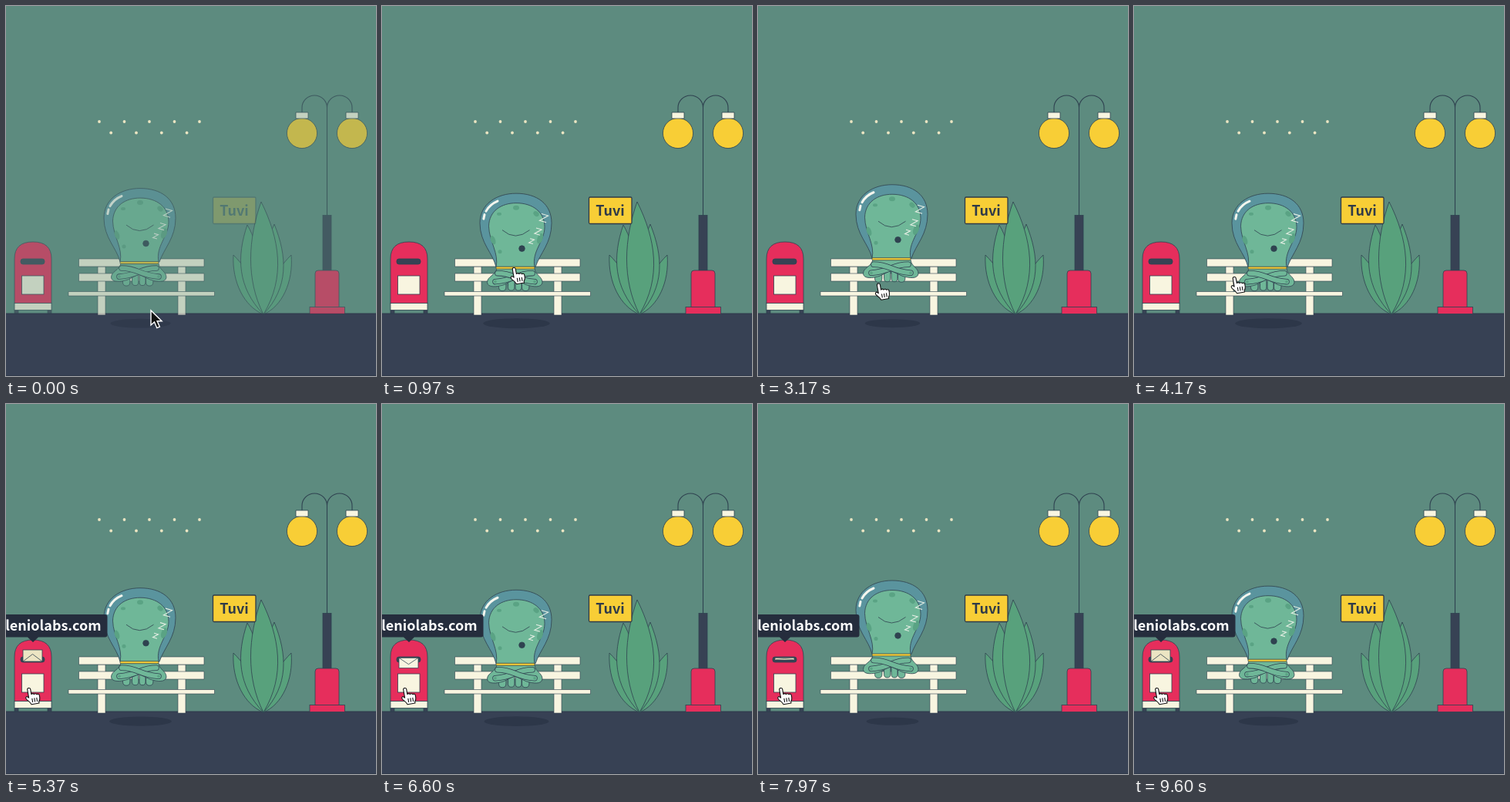
An HTML page that plays this animation: 480 px wide and 480 px high, repeating every 9.63 s.

```html
<!DOCTYPE html>
<html lang="en">
<head>
<meta charset="utf-8">
<title>Park bench</title>
<style>
  html, body { margin: 0; height: 100%; overflow: hidden; background: #5d8b7f; }
  svg { display: block; width: 100vw; height: 100vh; }
  text { font: bold 18px "Noto Sans CJK SC", "Noto Sans CJK JP", "Noto Sans", sans-serif; }
  .line { fill: none; stroke: #2f4250; }
  .ink { fill: #374254; }
  .red { fill: #e62e5c; }
  .cream { fill: #f8f5e0; }
  .yellow { fill: #f8ce36; }
  .skin { fill: #6fb798; }
  .spot { fill: #5aa384; stroke: none; }
  .leaf { fill: #58a17c; }
</style>
</head>
<body>
<svg viewBox="0 0 480 480">
  <rect width="480" height="480" fill="#5d8b7f"/>
  <rect y="399" width="480" height="81" fill="#374154"/>
  <path d="M0 399H480M0 479.5H480" stroke="#2f394a"/>
  <g id="dots" fill="#ebe5c2"></g>

  <g id="scene" stroke="#2f4250" stroke-width=".8">
    <ellipse id="shadow" cx="174.5" cy="411.7" fill="#2d3749" stroke="none"/>

    <g id="mailbox">
      <path class="ink" d="M11 394h5v5h-5zM54 394h5v5h-5z"/>
      <path class="red" d="M11 386V328Q11 306 35 306T59 328V386Z"/>
      <rect class="cream" x="11" y="385.500" width="48" height="9"/>
      <rect class="ink" x="19" y="328" width="31" height="7" rx="3"/>
      <rect class="cream" x="20.500" y="350" width="28.500" height="24"/>
      <g id="envelope">
        <rect x="22" y="-2.500" width="25" height="15"/>
        <path class="line" d="M22-2.500L34.500 7L47-2.500"/>
      </g>
    </g>

    <g class="leaf">
      <path d="M295 323C293 358 309 390 334 400C330 372 318 346 295 323Z"/>
      <path d="M370 323C373 358 358 390 334 400C336 372 347 346 370 323Z"/>
      <path d="M313 284C299 325 300 365 334 400C334 360 330 312 313 284Z"/>
      <path d="M348 283C365 325 367 365 334 400C334 360 335 312 348 283Z"/>
      <path d="M331 254C314 302 311 355 334 400C363 352 355 302 331 254Z"/>
    </g>

    <path class="line" stroke-width="1.100" d="M416.500 272V132A16.250 16 0 0 0 384 132V138M416.500 132A16.250 16 0 0 1 449 132V138"/>
    <rect class="ink" x="411" y="271.500" width="11" height="72"/>
    <path class="red" d="M401 391V347q0-4 4-4h23q4 0 4 4V391Z"/>
    <rect class="red" x="394" y="390.500" width="45.500" height="9"/>
    <g class="yellow"><circle cx="384" cy="165" r="19.600"/><circle cx="449" cy="165" r="19.600"/></g>
    <path class="cream" d="M376 138h16v8h-16zM441 138h16v8h-16z"/>

    <g class="cream" stroke-width=".6">
      <path d="M119 338h10v63h-10zM223 338h10v63h-10z"/>
      <path d="M94.500 328h162.500v10H94.500zM94.500 347h162.500v10H94.500zM81 370.500h189.500v5.500H81z"/>
    </g>

    <g id="alien">
      <path fill="#5a949e" d="M148 323C144 305 127 292 127 266C127 241 149 227.500 174 227.500C201 227.500 220 241 220 266C220 292 205 305 199 323Z"/>
      <path class="skin" d="M148 323C152 305 139 290 138.500 270C139 250 155 240 174 240C196 240 211 252 211 271C211 290 194 302 198 323Z"/>
      <g class="spot">
        <ellipse cx="174" cy="246" rx="4" ry="3"/>
        <ellipse cx="200" cy="254" rx="4" ry="3" transform="rotate(40 200 254)"/>
        <ellipse cx="152" cy="254" rx="3" ry="2"/>
        <ellipse cx="144" cy="288" rx="3" ry="6" transform="rotate(-20 144 288)"/>
        <circle cx="153" cy="303" r="2.500"/>
        <ellipse cx="205" cy="286" rx="3.500" ry="7" transform="rotate(20 205 286)"/>
      </g>
      <path class="line" d="M156 275Q173 290 191.500 275"/>
      <circle cx="181.500" cy="299" r="3.800" fill="#2f4250"/>
      <path d="M131.800 260.500L133 255M135 250.500Q140 241.500 150 237.500" fill="none" stroke="#f4f6ee" stroke-width="3" stroke-linecap="round"/>
      <path class="skin" d="M151.500 336v13q0 5 4.700 5t4.700-5v-13M163.500 336v13q0 4.500 4.200 4.500t4.200-4.500v-13M173 336v13q0 4.500 4 4.500t4-4.500v-13M181.500 336v13q0 5 4.700 5t4.700-5v-13"/>
      <path class="skin" d="M149 325C147 334 136.500 335 136.500 343C137 350 149 349 158 346L172 339L187 346C197 349 207 350 208 343C208 335 199 334 198 325Z"/>
      <g id="arms" fill="none" stroke-linecap="round"></g>
      <circle class="spot" cx="147" cy="342" r="1.800"/>
      <circle class="spot" cx="198" cy="342" r="1.800"/>
      <rect class="yellow" x="148" y="322.500" width="50" height="3" rx="1" stroke-width=".7"/>
      <g id="zs" fill="none" stroke="#e5eee4" stroke-width="1.100"></g>
    </g>
  </g>

  <g id="sign">
    <rect class="yellow" x="268.500" y="248" width="55.500" height="34.500" rx="1.500" stroke="#2f3a48" stroke-width="1.300"/>
    <text x="296" y="271.500" text-anchor="middle" fill="#2f3a48">Tuvi</text>
  </g>

  <g id="tooltip">
    <path fill="#252d3d" d="M-20 273H128.500q3 0 3 3V299.500q0 3-3 3H42L35 309L28 302.500H-20Z"/>
    <text x="123.500" y="294" text-anchor="end" fill="#fff">leniolabs.com</text>
  </g>

  <g id="cursor">
    <path id="arrow" d="M0 0V19l4.500-4 3.300 7.700 3.600-1.500-3.300-7.400h6Z" fill="#111" stroke="#fff" stroke-width="1.400"/>
    <g id="hand" transform="rotate(-10)" stroke="#111" stroke-width="1.100" stroke-linejoin="round">
      <path fill="#fff" d="M-2 12V1.500a2 2 0 0 1 4 0V8q2-1.500 3.500.6q2-1.400 3.500.8q2.500-1 3 1.500V14q0 3-2 5V21H0q-1-3-5-7q-2-3 .5-4q1 0 2.500 2Z"/>
      <path d="M2 13.500v5M5 13.500v5M8 13.500v5"/>
    </g>
  </g>
</svg>
<script>
const LOOP = 9.63;
const el = id => document.getElementById(id);
const set = (id, attrs) => { for (const k in attrs) el(id).setAttribute(k, attrs[k]); };
const clamp = v => Math.max(0, Math.min(1, v));

for (let i = 0; i < 9; i++) {
  const lower = i > 4;
  el("dots").innerHTML += `<circle cx="${lower ? 136.2 + 32.8 * (i - 5) : 121 + 32.5 * i}" cy="${lower ? 164.5 : 150}" r="1.9"/>`;
}
for (const d of ["M147 342Q160 341 172 336T195 331", "M198 342Q185 341 173 336T150 331"])
  el("arms").innerHTML += `<path d="${d}" stroke-width="7.5"/><path d="${d}" stroke="#6fb798" stroke-width="5.900"/>`;
for (const [x, y, size] of [[210, 259.5, 4.5], [202.5, 277, 3.7], [194, 289.5, 2.8]])
  el("zs").innerHTML += `<path transform="translate(${x} ${y}) rotate(16) scale(${size})" d="M-1-1H1L-1 1H1" vector-effect="non-scaling-stroke"/>`;

// Keys are [time, ...values]; each span eases in and out.
function along(keys, t) {
  const i = Math.max(1, keys.findIndex(k => k[0] >= t));
  const a = keys[i - 1], b = keys[i];
  const p = (1 - Math.cos(Math.PI * clamp((t - a[0]) / (b[0] - a[0])))) / 2;
  return a.slice(1).map((v, j) => v + (b[j + 1] - v) * p);
}
const bob = [[-0.95, 0], [0.8, 16], [2.56, 0], [4.33, 16], [5.1, 10.5], [6.2, 15.5], [7.95, 1.5], [8.68, 0], [10.43, 16]];
const pointer = [[0, 188, 395], [0.9, 171, 340], [2.6, 171, 338], [3.5, 150, 370], [4.17, 130, 352], [4.5, 88, 374], [4.85, 29.5, 369], [LOOP, 29.5, 369]];

function draw(t) {
  const [y] = along(bob, t), [px, py] = along(pointer, t);
  set("scene", { opacity: clamp(0.66 + t) });
  set("sign", { opacity: clamp(0.22 + t * 1.1) });
  set("alien", { transform: `translate(0 ${y})` });
  set("shadow", { rx: 33 + 0.66 * y, ry: 5 + 0.1 * y });

  const hover = t - 4.85;
  const flip = -Math.sin(hover * 2 * Math.PI / 2.115);
  set("tooltip", { opacity: clamp((hover + 0.1) * 5) });
  set("envelope", {
    transform: `translate(0 331.5) scale(1 ${flip})`,
    fill: flip < 0 ? "#ece5c3" : "#f8f5e0",
    opacity: hover > 0 ? 1 : 0
  });

  const hand = (t > 0.6 && t < 4.25) || t > 4.75;
  set("cursor", { transform: `translate(${px} ${py})` });
  set("hand", { opacity: +hand });
  set("arrow", { opacity: +!hand });
}

const start = performance.now();
function tick() {
  draw((performance.now() - start) / 1000 % LOOP);
  requestAnimationFrame(tick);
}
tick();
</script>
</body>
</html>
```
